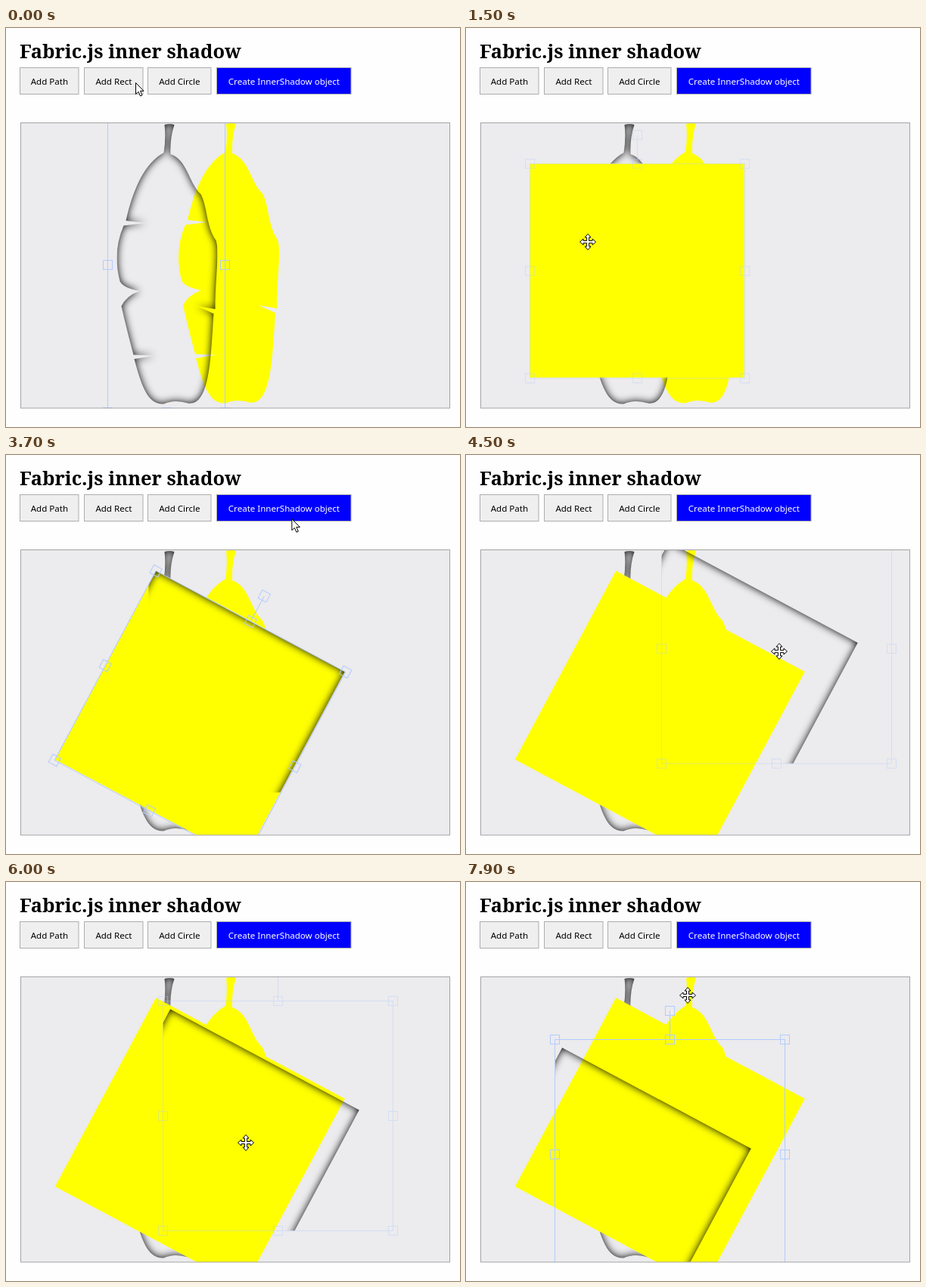
Animation of 600 by 528 pixels, one loop 8 s. Source, as an HTML page:

```html
<!DOCTYPE html>
<html lang="en">
<head>
<meta charset="utf-8">
<title>Inner shadow</title>
<style>
html, body { margin: 0; width: 100%; height: 100%; overflow: hidden; background: #fefefe; }
svg { display: block; width: 600px; height: 528px; }
.title { font: bold 25.4px "Noto Serif", serif; }
.label { font: 11.55px "Noto Sans", "Open Sans", sans-serif; text-anchor: middle; }
.yellow { fill: #ff0; }
.sel { fill: none; stroke: #b2ccff; }
.hole { fill-rule: evenodd; filter: url(#blur); }
.cursor { fill: #fff; stroke: #000; }
.frame { fill: none; stroke: #a3a3a6; }
</style>
</head>
<body>
<svg viewBox="0 0 600 528" xmlns="http://www.w3.org/2000/svg">
  <defs>
    <filter id="blur" filterUnits="userSpaceOnUse" x="-100" y="-100" width="900" height="800">
      <feGaussianBlur stdDeviation="5.2"/>
    </filter>
    <clipPath id="view"><rect x="20" y="126" width="566" height="377"/></clipPath>
    <clipPath id="leafClip"><path id="leafClipPath"/></clipPath>
    <clipPath id="boxClip"><path id="boxClipPath"/></clipPath>
    <clipPath id="bounds"><rect x="188.5" y="142.5" width="304" height="304"/></clipPath>
  </defs>
  <rect width="600" height="528" fill="#fefefe"/>
  <text class="title" x="18" y="40">Fabric.js inner shadow</text>
  <g id="buttons"></g>
  <g clip-path="url(#view)">
    <rect width="600" height="528" fill="#ecebed"/>
    <path id="leaf" class="yellow"/>
    <g transform="translate(-81.5 1)"><g clip-path="url(#leafClip)"><path id="leafHole" class="hole"/></g></g>
    <rect id="box" class="yellow" x="-142" y="-142" width="283" height="283"/>
    <g id="boxShadow"><g clip-path="url(#bounds)"><g clip-path="url(#boxClip)"><path id="boxHole" class="hole"/></g></g></g>
    <g id="selections"></g>
  </g>
  <rect class="frame" x="19.5" y="125.5" width="567" height="377.5"/>
  <path id="arrow" class="cursor" d="M.5.5V15.5L4 12.3L6.6 18L9 17L6.5 11.3H11Z"/>
  <path id="move" class="cursor" d="M1.5-1.5V-6H4L0-10.5L-4-6H-1.5V-1.5H-6V-4L-10.5 0L-6 4V1.5H-1.5V6H-4L0 10.5L4 6H1.5V1.5H6V4L10.5 0L6-4V-1.5Z"/>
  <path id="cross" d="M-11 0H11M0-11V11" stroke="#000" stroke-width="2"/>
</svg>
<script>
const $ = id => document.getElementById(id);
const LOOP = 8000, STEP = 100, ANGLE = 28.1;

function add(parent, name, attrs, text) {
  const el = document.createElementNS("http://www.w3.org/2000/svg", name);
  for (const k in attrs) el.setAttribute(k, attrs[k]);
  if (text) el.textContent = text;
  return parent.appendChild(el);
}
const place = (el, [x, y], turn = 0) => el.setAttribute("transform", `translate(${x} ${y}) rotate(${turn})`);
const show = (el, on) => el.style.display = on ? "" : "none";

function button(name, x, w, fill, color) {
  add($("buttons"), "rect", { x: x + .5, y: 52.5, width: w - .5, height: 35, fill, stroke: "#adadad" });
  add($("buttons"), "text", { class: "label", x: x + w / 2 + .4, y: 74.5, fill: color }, name);
}
button("Add Path", 18, 78, "#efefef", "#000");
button("Add Rect", 103, 78, "#efefef", "#000");
button("Add Circle", 187, 84, "#efefef", "#000");
button("Create InnerShadow object", 278, 178, "#00f", "#fff");

// Shapes; an inner shadow is the blurred outside of a shape, clipped to its inside
const leafPath = "M299 166C321 173 323 204 339 219C348 236 346 262 359 280C364 295 358 330 358 371" +
  "L334 367 356 377C352 430 352 500 322 495.5Q304 490 290 496.5C268 498 260 470 251 437" +
  "L278 432.5 250 431.5C243 405 238 385 234 367Q241 353 258 347Q236 343 232 334Q222 295 237 260.5" +
  "L266 257 240 254C250 210 265 178 290 164Q293 145 291 127Q298 125 304 127Q298 145 299 166Z";
const polar = deg => [Math.cos(deg * Math.PI / 180), Math.sin(deg * Math.PI / 180)];
const [cos, sin] = polar(ANGLE);
const corner = (x, y) => [256.5 + x * cos - y * sin, 345.5 + x * sin + y * cos];
const boxPath = "M" + [corner(-142, -142), corner(141, -142), corner(141, 141), corner(-142, 141)].join("L") + "Z";
const outside = "M-90-90H700V640H-90Z";
$("leaf").setAttribute("d", leafPath);
for (const [id, d] of [["leaf", leafPath], ["box", boxPath]]) {
  $(id + "ClipPath").setAttribute("d", d);
  $(id + "Hole").setAttribute("d", outside + d);
}

// Selection frame with eight handles and a rotation handle
function selection(w, h) {
  const g = add($("selections"), "g", { class: "sel" });
  const handle = (x, y) => add(g, "rect", { x: x - 6, y: y - 6, width: 12, height: 12 });
  add(g, "rect", { x: -w / 2, y: -h / 2, width: w, height: h });
  add(g, "path", { d: `M0 ${-h / 2}v-38` });
  for (const i of [-1, 0, 1]) for (const j of [-1, 0, 1])
    if (i || j) handle(i * w / 2, j * h / 2);
  handle(0, -h / 2 - 38);
  return g;
}
const leafSel = selection(155, 390), boxSel = selection(284, 284), shadowSel = selection(304, 304);
place(leafSel, [212, 313.5]);

// Motion
const span = (t, a, b) => Math.max(0, Math.min(1, (t - a) / (b - a)));
const ease = u => u * u * (3 - 2 * u);
const easeOut = u => 1 - (1 - u) ** 3;
const plus = (p, q) => p.map((v, i) => v + q[i]);
const mix = (p, q, u) => p.map((v, i) => v + (q[i] - v) * u);
const bend = (p, q, r, u) => mix(mix(p, q, u), mix(q, r, u), u);
const glide = (t, a, b, p, q) => mix(p, q, ease(span(t, a, b)));

const boxAt = t => glide(t, 1200, 1700, [171.5, 277.5], [256.5, 345.5]);
const turnAt = t => ANGLE * ease(span(t, 2400, 2900));
const shadowAt = t => t < 5500
  ? bend([0, 0], [61, -30], [113, -66], easeOut(span(t, 4300, 5060)))
  : bend([113, -66], [17, 30], [-71, 66], ease(span(t, 5700, 6300)));

function knobAt(t) {
  const [x, y] = polar(turnAt(t) - 90);
  return [256.5 + 180 * x, 345.5 + 180 * y];
}

// Pointer legs: end time, shape, position
const legs = [
  [700, "arrow", t => glide(t, 500, 1100, [171, 72], [106, 239])],
  [1200, "move", t => glide(t, 500, 1100, [171, 72], [106, 239])],
  [1700, "move", t => plus(boxAt(t), [-65.5, -38.5])],
  [2000, "move", t => glide(t, 1700, 2100, [191, 307], [256.5, 165])],
  [2300, "cross", t => glide(t, 1700, 2100, [191, 307], [256.5, 165])],
  [2900, "cross", t => knobAt(t + 200)],
  [3500, "arrow", t => glide(t, 2800, 3100, [341, 187], [380, 67])],
  [3900, "arrow", t => glide(t, 3600, 4200, [380, 67], [344, 298])],
  [4300, "move", t => glide(t, 3600, 4200, [380, 67], [344, 298])],
  [5200, "move", t => plus(shadowAt(t), [344, 298])],
  [5600, "move", t => glide(t, 5200, 5400, [457, 232], [411, 264])],
  [6700, "move", t => plus(shadowAt(t), [298, 330])],
  [7100, "move", t => glide(t, 6700, 7000, [227, 396], [219, 195])],
  [LOOP, "move", t => glide(t, 7100, 7900, [219, 195], [293, 150])]
];

function draw(time) {
  const t = Math.floor(time % LOOP / STEP) * STEP;
  const within = (a, b) => t >= a && t < b;
  const shift = shadowAt(t);
  place($("box"), boxAt(t), turnAt(t));
  place(boxSel, boxAt(t), turnAt(t));
  place($("boxShadow"), shift);
  place(shadowSel, plus(shift, [340.5, 294.5]));
  show($("box"), t >= 500);
  show($("boxShadow"), t >= 3300);

  show(leafSel, t < 1100);
  show(boxSel, within(1100, 4400));
  show(shadowSel, t >= 4400);
  boxSel.style.opacity = within(1300, 1800) ? .4 : 1;
  shadowSel.style.opacity = within(4400, 5300) || within(5800, 6800) ? .4 : 1;

  const [, shape, at] = legs.find(leg => t < leg[0]);
  for (const id of ["arrow", "move", "cross"]) show($(id), id === shape);
  place($(shape), at(t));
}

const start = performance.now();
function loop() {
  draw(performance.now() - start);
  requestAnimationFrame(loop);
}
loop();
</script>
</body>
</html>
```
